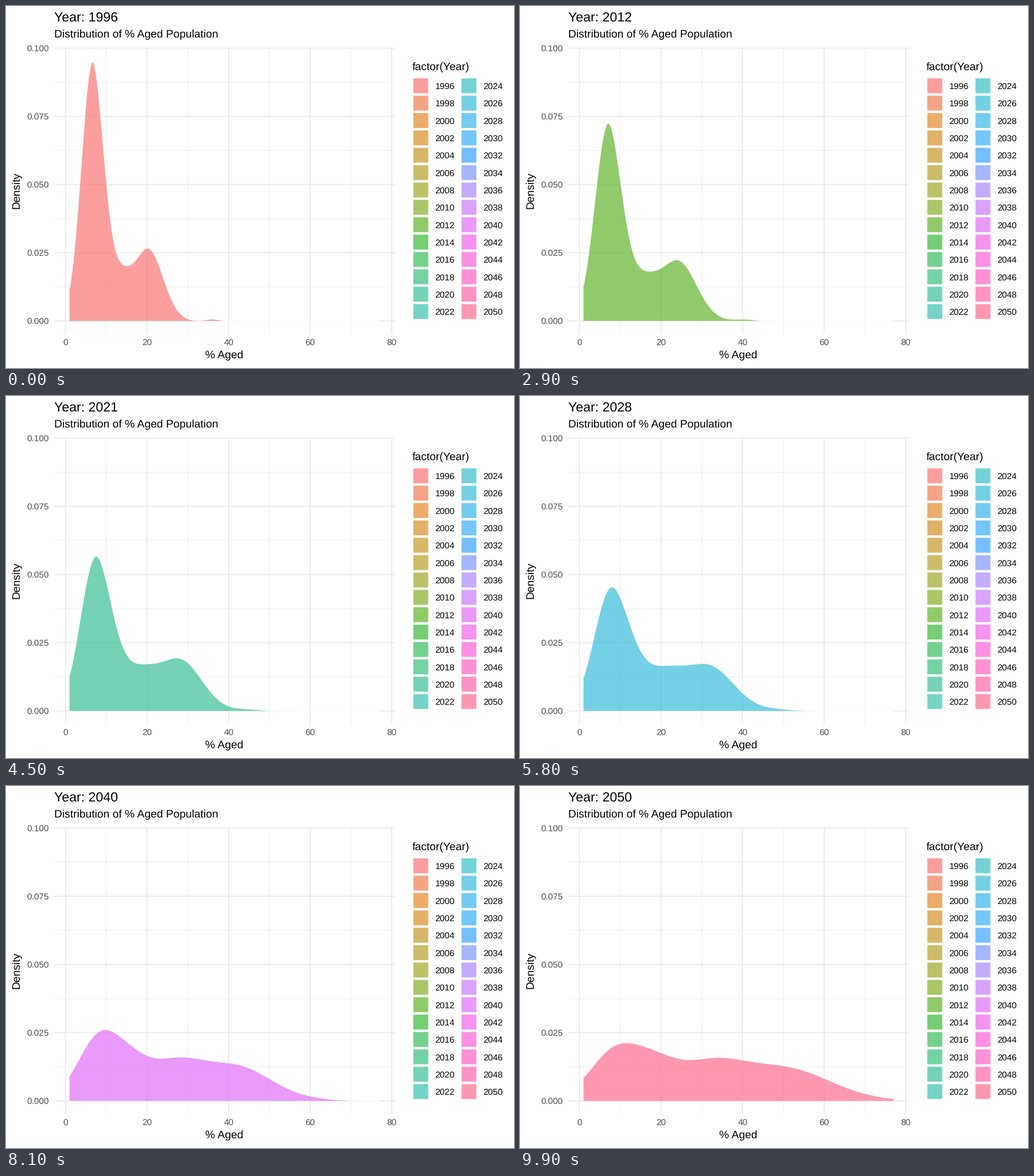
A matplotlib script that plays this animation: 885x632 px, repeating every 10000 ms.

```python
import numpy as np
import matplotlib.pyplot as plt
from matplotlib.animation import FuncAnimation
from matplotlib.patches import Polygon, Rectangle

W, H, DPI = 885, 632, 64
PX = 72 / DPI                      # points per pixel
UNIT = 1.755                       # pixels per theme point
BASE, SMALL, BIG = 11 * UNIT, 8.8 * UNIT, 13.2 * UNIT
MAJOR, MINOR = 1.87, 0.94
ALPHA = 0.7
FRAMES = 100
FIRST, LAST = 1996, 2050
YEARS = range(FIRST, LAST + 1, 2)

plt.rcParams["font.family"] = "Liberation Sans"
plt.rcParams["text.hinting"] = "none"

# Country groups as (centre, spread, height / 1000), first year -> last year.
GROUPS = [
    ((6.4, 2.7, 88), (9.0, 6.4, 18.6)),
    ((9.8, 2.8, 14), (19, 5.5, 8.7)),
    ((14, 2.3, 8.5), (32, 8.5, 13)),
    ((20.3, 3.7, 26.5), (51, 10.5, 11.6)),
    ((36, 1.7, 0.7), (70, 8, 0.5)),
]


def sx(v):
    return 103.5 + 7.107 * v


def sy(v):
    return 549.7 - 4762 * v


def hcl(h, c=100, l=65):
    """Polar LUV colour to RGB, with red and blue lifted off black."""
    h = np.radians(h)
    y = ((l + 16) / 116) ** 3
    u = c * np.cos(h) / (13 * l) + 0.1978398
    v = c * np.sin(h) / (13 * l) + 0.4683363
    x = 9 * y * u / (4 * v)
    z = -x / 3 - 5 * y + 3 * y / v
    rgb = np.array([[3.240479, -1.537150, -0.498535],
                    [-0.969256, 1.875992, 0.041556],
                    [0.055648, -0.204043, 1.057311]]) @ [x, y, z]
    rgb = np.clip(rgb, 0, 1)
    rgb += np.array([0.042, 0, 0.024]) * (1 - rgb)
    return np.where(rgb > 0.00304, 1.055 * rgb ** (1 / 2.4) - 0.055, 12.92 * rgb)


SHARE = np.linspace(1, 77, 400)


def density(year):
    """Groups age and spread ever faster; heights ease in and out."""
    t = (year - FIRST) / (LAST - FIRST)
    drift = t ** 1.7
    s = t ** 0.83
    ease = s * s * (3 - 2 * s)
    total = np.zeros_like(SHARE)
    for start, end in np.array(GROUPS):
        mid, sd, height = start + (end - start) * [drift, drift, ease]
        total += height / 1000 * np.exp(-((SHARE - mid) / sd) ** 2 / 2)
    return total


COLORS = [hcl(15 + 360 * k / len(YEARS)) for k in range(len(YEARS))]
CURVES = [density(year) for year in YEARS]

fig = plt.figure(figsize=(W / DPI, H / DPI), dpi=DPI, facecolor="white")
ax = fig.add_axes([0, 0, 1, 1])
ax.set(xlim=(0, W), ylim=(H, 0))
ax.axis("off")


def text(x, y, s, size, color="black", **kw):
    return ax.text(x, y, s, fontsize=size * PX, color=color, va="baseline", **kw)


def grid(xs, ys, width):
    style = dict(color="#EBEBEB", lw=width * PX, solid_capstyle="butt",
                 snap=False, zorder=1)
    for y in ys:
        ax.plot([83.6, 677.8], [sy(y)] * 2, **style)
    for x in xs:
        ax.plot([sx(x)] * 2, [73.2, 572.4], **style)


x_ticks, y_ticks = range(0, 81, 20), np.linspace(0, 0.1, 5)
grid(range(10, 71, 20), y_ticks[:-1] + 0.0125, MINOR)
grid(x_ticks, y_ticks, MAJOR)

for v in x_ticks:
    text(sx(v), 592.3, str(v), SMALL, "#4D4D4D", ha="center")
for v in y_ticks:
    text(74.9, sy(v) + 5.6, f"{v:.3f}", SMALL, "#4D4D4D", ha="right")

title = text(83.6, 26.3, "", BIG)
text(83.6, 55.3, "Distribution of % Aged Population", BASE)
text(380.7, 614.7, "% Aged", BASE, ha="center")
text(23.5, 322, "Density", BASE, ha="center", rotation=90,
     rotation_mode="anchor")

text(707.4, 112.3, "factor(Year)", BASE)
KEY = 26
for k, (year, color) in enumerate(zip(YEARS, COLORS)):
    col, row = divmod(k, 14)
    cx, cy = 722.6 + 83.9 * col, 139.3 + 30.32 * row
    ax.add_patch(Rectangle((cx - KEY / 2, cy - KEY / 2), KEY, KEY, fc=color,
                           ec="none", alpha=ALPHA, snap=False))
    text(cx + 24.8, cy + 5.6, str(year), SMALL)

area = ax.add_patch(Polygon([(0, 0), (1, 0), (0, 1)], ec="none", alpha=ALPHA,
                            zorder=2))
outline, = ax.plot([], [], color="white", lw=MAJOR * PX,
                   solid_capstyle="butt", snap=False, zorder=3)


def update(i):
    k = (3 * i + 1) // 11          # latest curve reached
    xs, ys = sx(SHARE), sy(CURVES[k])
    base = [(xs[-1], sy(0)), (xs[0], sy(0))]
    area.set_xy(np.vstack([np.column_stack([xs, ys]), base]))
    area.set_facecolor(COLORS[k])
    outline.set_data(xs, ys)
    title.set_text(f"Year: {round(FIRST + (LAST - FIRST) * i / (FRAMES - 1))}")
    return area, outline, title


anim = FuncAnimation(fig, update, frames=FRAMES, interval=100, repeat=True,
                     repeat_delay=0)
plt.show()
```
